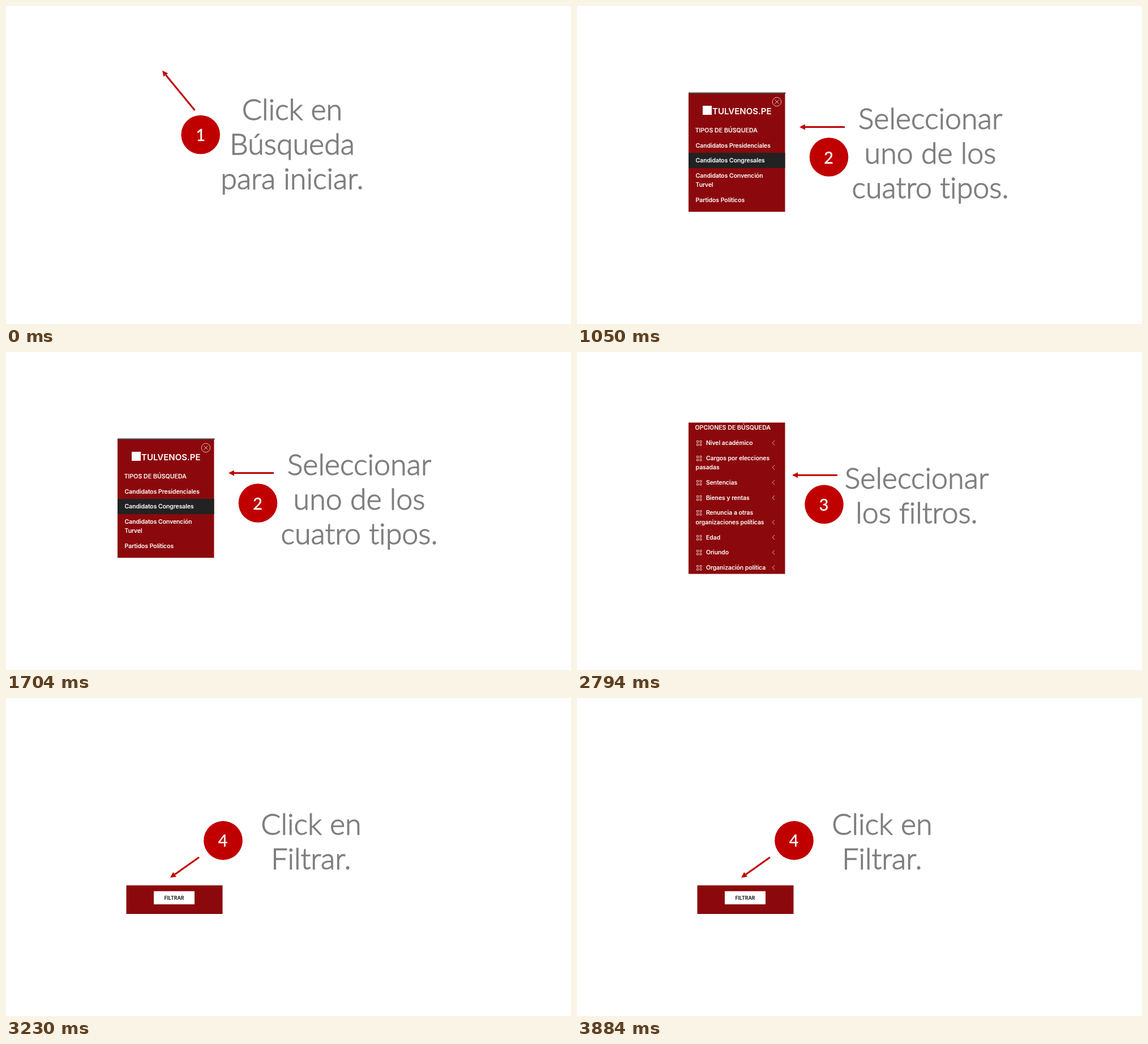
Recreate the animation shown at these times as an HTML page. Size 998 px wide and 561 px high, loop 4.32 s.

```html
<!DOCTYPE html>
<html lang="es">
<head>
<meta charset="utf-8">
<title>Pasos de búsqueda</title>
<style>
html, body { margin: 0; width: 100%; height: 100%; overflow: hidden; background: #fff; }
svg { display: block; width: 100%; height: 100%; }

.step { visibility: hidden; animation: 4320ms step-end infinite; }
.one { animation-name: one; }
.two { animation-name: two; }
.three { animation-name: three; }
.four { animation-name: four; }
@keyframes one { 0% { visibility: visible; } 24.306%, 100% { visibility: hidden; } }
@keyframes two { 0% { visibility: hidden; } 24.306% { visibility: visible; } 49.537%, 100% { visibility: hidden; } }
@keyframes three { 0% { visibility: hidden; } 49.537% { visibility: visible; } 74.769%, 100% { visibility: hidden; } }
@keyframes four { 0% { visibility: hidden; } 74.769%, 100% { visibility: visible; } }

.title { font: 300 52px Lato, "Open Sans", sans-serif; font-variant-ligatures: none; fill: #7f7f7f; stroke: #7f7f7f; stroke-width: 1.3; text-anchor: middle; }
.num { font: 400 28.5px Lato, sans-serif; fill: #fff; stroke: #fff; stroke-width: .4; text-anchor: middle; }
.ball { fill: #c00000; }
.arrow { fill: none; stroke: #c00000; stroke-width: 3; }
.panel { fill: #8b090c; }
.menu { font: 500 10.45px Inter, sans-serif; fill: #fff; stroke: #fff; stroke-width: .2; }
.head { font-size: 10.6px; }
.brand { font: 600 15px Inter, sans-serif; fill: #fff; }
.thin { fill: none; stroke: #e3b9ba; stroke-width: 1; }
.btn { font: 700 8.6px Inter, sans-serif; fill: #222; text-anchor: middle; }
</style>
</head>
<body>
<svg viewBox="0 0 998 561">
  <defs>
    <marker id="tip" markerUnits="userSpaceOnUse" markerWidth="10" markerHeight="10" refX="0" refY="5" orient="auto">
      <path d="M0 0L10 5L0 10Z" fill="#c00000"/>
    </marker>
    <path id="grid" class="thin" d="M.5 .5h3v3h-3zM6 .5h3v3h-3zM.5 6h3v3h-3zM6 6h3v3h-3z"/>
    <path id="chev" class="thin" d="M349 -4L345.2 0L349 4"/>
  </defs>

  <g class="step one">
    <path class="arrow" d="M333.5 184L282.3 121.7" marker-end="url(#tip)"/>
    <circle class="ball" cx="343.7" cy="227" r="34.3"/>
    <text class="num" x="343.7" y="238">1</text>
    <g class="title">
      <text x="505.5" y="201">Click en</text>
      <text x="505.5" y="262">Búsqueda</text>
      <text x="505.5" y="323">para iniciar.</text>
    </g>
  </g>

  <g class="step two">
    <rect class="panel" x="197" y="153" width="170.5" height="210"/>
    <rect x="197" y="152.5" width="171.5" height="2.2" fill="#4a4346"/>
    <rect x="197" y="259" width="170.5" height="27" fill="#222"/>
    <path class="thin" d="M349.5 165.5l7 7m0 -7l-7 7"/>
    <circle class="thin" cx="353" cy="169" r="7.8"/>
    <rect x="222" y="176" width="16" height="16" fill="#fff"/>
    <text class="brand" x="239" y="191.3">TULVENOS.PE</text>
    <g class="menu">
      <text class="head" x="208.7" y="223">TIPOS DE BÚSQUEDA</text>
      <text x="209.6" y="249.8">Candidatos Presidenciales</text>
      <text x="209.6" y="276.3">Candidatos Congresales</text>
      <text x="209.6" y="303">Candidatos Convención</text>
      <text x="209.6" y="319.3">Turvel</text>
      <text x="209.6" y="346">Partidos Políticos</text>
    </g>
    <path class="arrow" d="M473 213.5H403" marker-end="url(#tip)"/>
    <circle class="ball" cx="445" cy="266.5" r="34.3"/>
    <text class="num" x="444.5" y="277.5">2</text>
    <g class="title">
      <text x="624" y="217">Seleccionar</text>
      <text x="624" y="278">uno de los</text>
      <text x="624" y="339">cuatro tipos.</text>
    </g>
  </g>

  <g class="step three">
    <rect class="panel" x="197" y="124.5" width="170.5" height="267"/>
    <g class="menu">
      <text class="head" x="208.5" y="137.3">OPCIONES DE BÚSQUEDA</text>
      <text x="228" y="164">Nivel académico</text>
      <text x="228" y="190.7">Cargos por elecciones</text>
      <text x="209.6" y="207.3">pasadas</text>
      <text x="228" y="234">Sentencias</text>
      <text x="228" y="260.7">Bienes y rentas</text>
      <text x="228" y="287.3">Renuncia a otras</text>
      <text x="209.6" y="304">organizaciones políticas</text>
      <text x="228" y="330.7">Edad</text>
      <text x="228" y="357.3">Oriundo</text>
      <text x="228" y="384">Organización política</text>
    </g>
    <use href="#grid" x="211" y="156"/>
    <use href="#grid" x="211" y="183"/>
    <use href="#grid" x="211" y="226"/>
    <use href="#grid" x="211" y="253"/>
    <use href="#grid" x="211" y="279"/>
    <use href="#grid" x="211" y="323"/>
    <use href="#grid" x="211" y="349"/>
    <use href="#grid" x="211" y="376"/>
    <use href="#chev" y="160.3"/>
    <use href="#chev" y="203.7"/>
    <use href="#chev" y="230.3"/>
    <use href="#chev" y="257"/>
    <use href="#chev" y="300.3"/>
    <use href="#chev" y="327"/>
    <use href="#chev" y="353.5"/>
    <use href="#chev" y="380.3"/>
    <path class="arrow" d="M460 217.2H390" marker-end="url(#tip)"/>
    <circle class="ball" cx="436.5" cy="268.8" r="34.3"/>
    <text class="num" x="436" y="279.8">3</text>
    <g class="title">
      <text x="600" y="241">Seleccionar</text>
      <text x="600" y="302">los filtros.</text>
    </g>
  </g>

  <g class="step four">
    <rect class="panel" x="212.5" y="330.5" width="170" height="50.5"/>
    <rect x="261" y="340.8" width="72" height="23.2" fill="#fff"/>
    <text class="btn" x="297" y="355.6">FILTRAR</text>
    <path class="arrow" d="M341 281L298.2 311.2" marker-end="url(#tip)"/>
    <circle class="ball" cx="383.5" cy="251.4" r="34.3"/>
    <text class="num" x="383" y="262.4">4</text>
    <g class="title">
      <text x="539" y="241">Click en</text>
      <text x="539" y="302">Filtrar.</text>
    </g>
  </g>
</svg>
</body>
</html>
```
